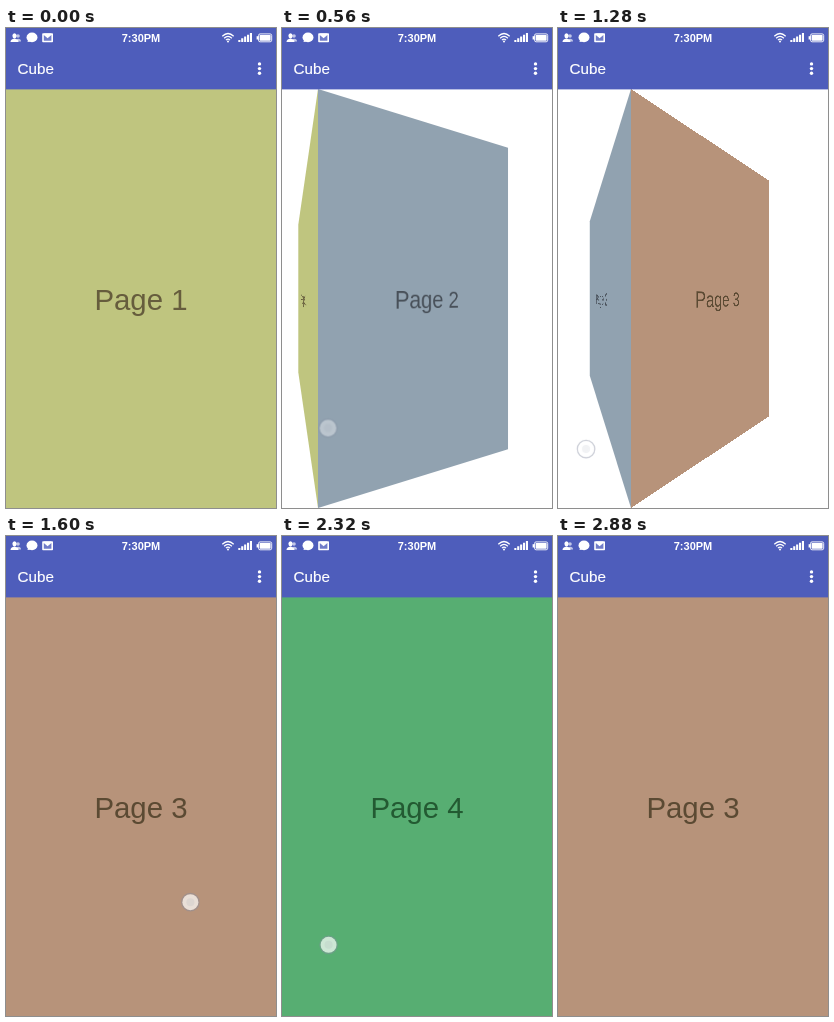
Animation, 270 px wide and 480 px high, one loop 2960 ms. Source, as an HTML page:

```html
<!DOCTYPE html>
<html lang="en">
<head>
<meta charset="utf-8">
<title>Cube</title>
<style>
  html, body { margin: 0; width: 100%; height: 100%; overflow: hidden; background: #fff; }
  body { position: relative; font-family: "Liberation Sans", Arial, sans-serif; }
  #pager { position: absolute; left: 0; top: 61px; width: 270px; height: 419px; overflow: hidden; }
  .page {
    position: absolute; left: 0; top: 0; width: 270px; height: 419px;
    font-size: 29.4px; line-height: 422px; text-align: center; white-space: nowrap;
    visibility: hidden;
  }
  #bar, #touch { position: absolute; left: 0; top: 0; display: block; }
  #touch { width: 24px; height: 24px; margin: -12px 0 0 -12px; }
</style>
</head>
<body>
<div id="pager"></div>

<svg id="bar" width="270" height="62" viewBox="0 0 270 62" fill="#fff">
  <rect width="270" height="61.4" fill="#4e5dbb"/>
  <!-- contacts -->
  <g>
    <g opacity=".65"><circle cx="12" cy="8" r="1.8"/><path d="M11 13.5v-2.6q4-.6 4 2.6z"/></g>
    <ellipse cx="8.5" cy="7.8" rx="2.1" ry="2.6"/>
    <path d="M4.5 14q0-3 4-3.6 4 .6 4 3.6z"/>
  </g>
  <!-- message -->
  <ellipse cx="26" cy="9.4" rx="5.5" ry="4.8"/>
  <path d="M22.2 11.5l-.7 2.6 3.4-.6z"/>
  <!-- mail -->
  <rect x="36.2" y="5.2" width="10.8" height="9" rx=".8"/>
  <path d="M37.8 6.9l3.8 3.3 3.8-3.3v5.8h-7.6z" fill="#4e5dbb" fill-opacity=".8"/>
  <path d="M37.8 5.6h7.6l-3.8 3.5z"/>
  <text x="135" y="13.8" font-size="11" font-weight="700" text-anchor="middle">7:30PM</text>
  <!-- wifi -->
  <path d="M216.3 8.2q5.7-5.4 11.4 0M218.1 10.2q3.9-3.6 7.8 0M219.9 12.1q2.1-1.8 4.2 0"
        fill="none" stroke="#fff" stroke-width="1.2"/>
  <circle cx="222" cy="13.4" r="1"/>
  <g id="signal"></g>
  <!-- battery -->
  <rect x="252.5" y="5.9" width="13.2" height="7.9" rx="1.6" fill="none" stroke="#fff" stroke-width=".9"/>
  <rect x="253.6" y="7" width="11" height="5.7" rx=".6"/>
  <rect x="250.6" y="8.2" width="1.6" height="3.3"/>
  <text x="11.6" y="46.2" font-size="15.2" stroke="#fff" stroke-width=".2">Cube</text>
  <circle cx="253.5" cy="35.9" r="1.7"/>
  <circle cx="253.5" cy="40.6" r="1.7"/>
  <circle cx="253.5" cy="45.3" r="1.7"/>
</svg>

<svg id="touch" viewBox="-12 -12 24 24">
  <circle r="8.6" fill="none" stroke="#858ca0" stroke-opacity=".45" stroke-width="1.4"/>
  <circle r="8" fill="#fff" fill-opacity=".7"/>
  <circle r="4" fill="#9aa4ac" fill-opacity=".15"/>
</svg>

<script>
const LOOP = 2960, STEP = 80, WIDTH = 270;
const DEPTH = 143.5, SLOP = 10, FADE = 190;
const STYLES = [
  { back: "#bfc57f", ink: "#665d3d" },
  { back: "#91a2b0", ink: "#485059" },
  { back: "#b7937a", ink: "#5b4a33" },
  { back: "#57ae72", ink: "#235a32" }
];

// Finger goes down, drags until "up", then the pager settles until "end".
const SWIPES = [
  { page: 0, next: 1, down: 150,  up: 473,  end: 913,  from: [218, 360], to: [46, 400] },
  { page: 1, next: 2, down: 870,  up: 1264, end: 1664, from: [218, 357], to: [28, 421] },
  { page: 2, next: 3, down: 1590, up: 1840, end: 2240, from: [185, 366], to: [53, 402] },
  { page: 3, next: 2, down: 2310, up: 2600, end: 2870, from: [46, 409],  to: [218, 362] }
];

const pager = document.getElementById("pager");
const touch = document.getElementById("touch");
const pages = STYLES.map(({ back, ink }, i) => {
  const page = document.createElement("div");
  page.className = "page";
  page.style.background = back;
  page.style.color = ink;
  page.textContent = "Page " + (i + 1);
  return pager.appendChild(page);
});

document.getElementById("signal").innerHTML = [0, 1, 2, 3, 4].map(i => {
  const h = 2 + i * 1.75;
  return `<rect x="${232.3 + i * 2.9}" y="${14 - h}" width="2.1" height="${h}"/>`;
}).join("");

const clamp = v => Math.min(1, Math.max(0, v));
const mix = (a, b, k) => a + (b - a) * k;
const smooth = k => k * k * (3 - 2 * k);

function fingerAt(swipe, t) {
  const k = smooth(clamp((t - swipe.down) / (swipe.up - swipe.down)));
  return swipe.from.map((v, i) => mix(v, swipe.to[i], k));
}

function progressAt(swipe, t) {
  const [x] = fingerAt(swipe, t);
  const dragged = Math.max(0, Math.abs(x - swipe.from[0]) - SLOP) / WIDTH;
  const left = 1 - clamp((t - swipe.up) / (swipe.end - swipe.up));
  return 1 - (1 - dragged) * left ** 5;
}

function placePages(scroll) {
  pages.forEach((page, i) => {
    const pos = i - scroll;
    const visible = Math.abs(pos) < .998;
    page.style.visibility = visible ? "visible" : "hidden";
    if (!visible) return;
    page.style.left = pos * WIDTH + "px";
    page.style.transformOrigin = pos < 0 ? "100% 50%" : "0 50%";
    page.style.transform = Math.abs(pos) < .001
      ? "none" : `perspective(${DEPTH}px) rotateY(${90 * pos}deg)`;
  });
}

function placeTouch(swipe, t) {
  const fade = clamp((t - swipe.up) / FADE);
  const [x, y] = fingerAt(swipe, t);
  touch.style.opacity = t < swipe.down ? 0 : 1 - fade;
  touch.style.transform = `translate(${x}px, ${y}px) scale(${1 + .1 * fade})`;
}

function draw(now) {
  const t = Math.floor(now % LOOP / STEP) * STEP;
  const swipe = SWIPES.filter(s => s.down <= t).pop() || SWIPES[0];
  placePages(mix(swipe.page, swipe.next, progressAt(swipe, t)));
  placeTouch(swipe, t);
}

const start = performance.now();
function tick() {
  draw(performance.now() - start);
  requestAnimationFrame(tick);
}
tick();
</script>
</body>
</html>
```
